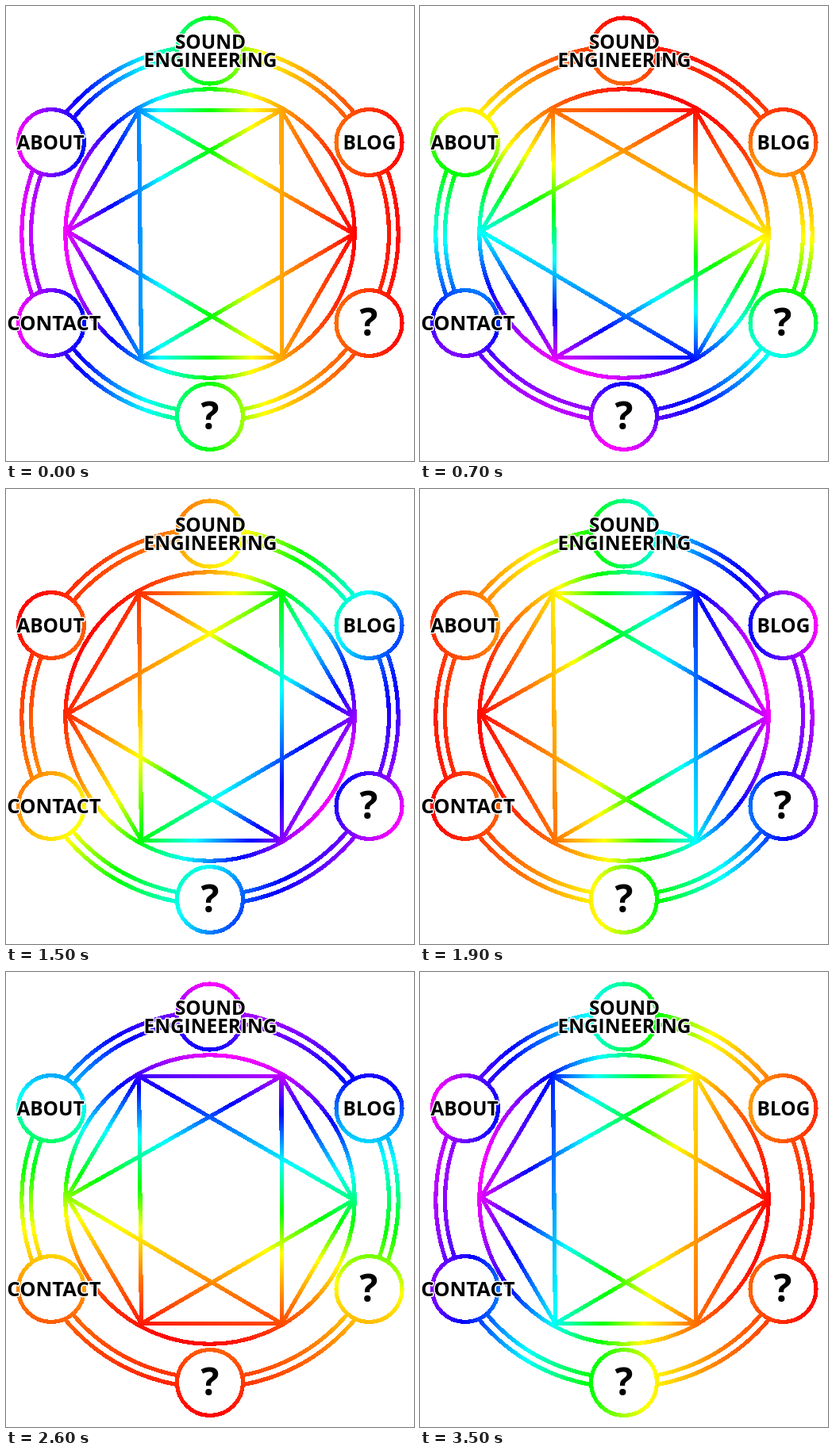
Recreate the animation shown at these times as an HTML page. Size 514 by 574 pixels, loop 3.6 s.

```html
<!DOCTYPE html>
<html lang="en">
<head>
<meta charset="utf-8">
<title>Colour wheel menu</title>
<style>
  html, body { margin: 0; width: 100%; height: 100%; overflow: hidden; background: #fff; }
  svg { display: block; width: 514px; height: 574px; }
  #outer, #inner { fill: none; stroke-width: 5.2px; shape-rendering: crispEdges; }
  text {
    font: 700 24.4px "Open Sans", "Noto Sans", sans-serif;
    text-anchor: middle;
    fill: #000;
    stroke: #fff;
    stroke-width: 3px;
    stroke-linejoin: round;
    paint-order: stroke;
  }
  text.wide { font-size: 25.6px; }
  text.mark { font-size: 48px; }
</style>
</head>
<body>
<svg viewBox="0 0 514 574">
  <defs>
    <linearGradient id="outerHue" gradientUnits="userSpaceOnUse"></linearGradient>
    <linearGradient id="innerHue" gradientUnits="userSpaceOnUse"></linearGradient>
  </defs>
  <g id="outer" stroke="url(#outerHue)"></g>
  <g id="inner" stroke="url(#innerHue)"></g>
  <g id="labels"></g>
</svg>
<script>
const NS = "http://www.w3.org/2000/svg";
const CENTER = [257, 287];
const NODE_RADIUS = 41.5;
const INNER_RADIUS = 182.3;
const STEP_MS = 100;
const STEPS = 36;

const byId = id => document.getElementById(id);

function add(parent, tag, attrs, content = "") {
  const node = document.createElementNS(NS, tag);
  for (const key in attrs) node.setAttribute(key, attrs[key]);
  node.textContent = content;
  parent.appendChild(node);
  return node;
}

const circle = (parent, [cx, cy], r, attrs = {}) =>
  add(parent, "circle", { cx, cy, r, ...attrs });

const hues = [
  ["#f0f", 0], ["#00f", 0.167], ["#0ff", 0.333], ["#0f0", 0.5],
  ["#ff0", 0.64], ["#ff7800", 0.8], ["#f00", 1]
];
for (const id of ["outerHue", "innerHue"]) {
  for (const [color, offset] of hues) add(byId(id), "stop", { offset, "stop-color": color });
}

// Double ring with six nodes on top
const nodes = [[257, 56.5], [457.5, 172], [457.5, 400], [257, 518], [57, 400], [57, 172]];
for (const r of [237.2, 225.5]) circle(byId("outer"), CENTER, r);
for (const p of nodes) circle(byId("outer"), p, NODE_RADIUS, { fill: "#fff" });

// Inner circle, hexagon and the chords that skip one corner
const corners = [[167.5, 131.5], [347, 131.5], [438, 287.5], [347.5, 443.5], [170.5, 443.5], [77, 284]];
circle(byId("inner"), CENTER, INNER_RADIUS);
corners.forEach((p, i) => {
  for (const skip of [1, 2]) {
    add(byId("inner"), "path", { d: `M${p}L${corners[(i + skip) % 6]}` });
  }
});

const labels = [
  ["SOUND", 257.5, 54], ["ENGINEERING", 257.5, 77], ["BLOG", 458, 181],
  ["CONTACT", 60.5, 408.5, "wide"], ["ABOUT", 56, 181],
  ["?", 457, 416, "mark"], ["?", 257, 533.5, "mark"]
];
for (const [word, x, y, kind = ""] of labels) {
  add(byId("labels"), "text", { x, y, class: kind }, word);
}

function aim(id, dx, dy, reach) {
  const [cx, cy] = CENTER;
  const ends = { x1: cx - dx * reach, y1: cy - dy * reach, x2: cx + dx * reach, y2: cy + dy * reach };
  for (const key in ends) byId(id).setAttribute(key, ends[key]);
}

function render(time) {
  const angle = Math.floor(time / STEP_MS) % STEPS * 2 * Math.PI / STEPS;
  const dx = Math.cos(angle), dy = -Math.sin(angle);
  // The outer gradient spans the extent of the nodes along its direction
  const extent = Math.max(...nodes.map(([x, y]) => (x - CENTER[0]) * dx + (y - CENTER[1]) * dy));
  aim("outerHue", dx, dy, extent + NODE_RADIUS + 2.5);
  aim("innerHue", dx, dy, INNER_RADIUS + 2.5);
}

const start = performance.now();
function tick() {
  render(performance.now() - start);
  requestAnimationFrame(tick);
}
tick();
</script>
</body>
</html>
```
